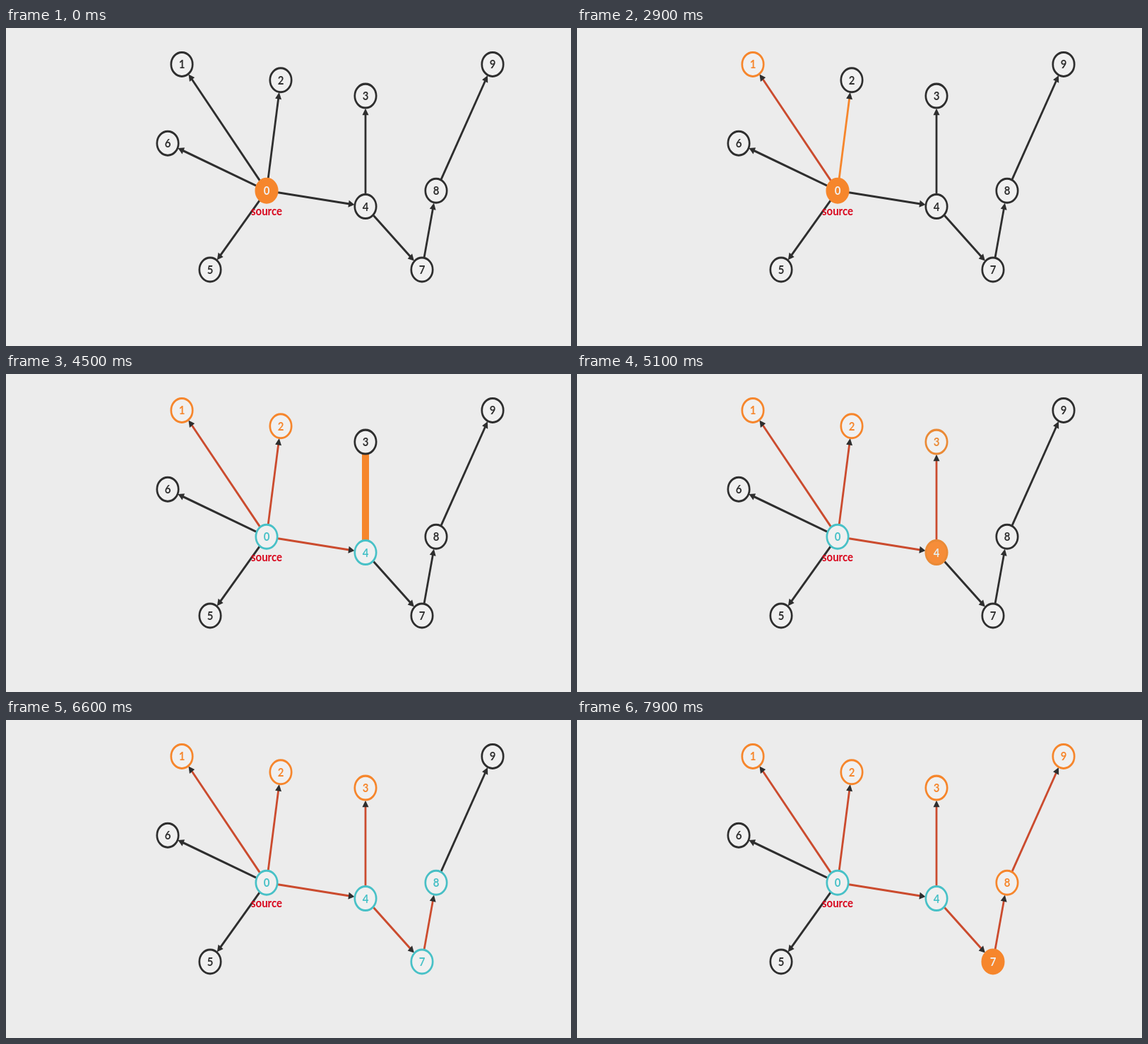
Animation of 800 by 450 pixels, one loop 8000 ms. Source, as an HTML page with a canvas:

```html
<!DOCTYPE html>
<html lang="en">
<head>
<meta charset="utf-8">
<title>Depth-first traversal</title>
<style>
html, body { margin: 0; width: 100%; height: 100%; overflow: hidden; background: #ececec; }
canvas { display: block; width: 100vw; height: 100vh; }
</style>
</head>
<body>
<canvas id="stage" width="800" height="450"></canvas>
<script>
const ctx = document.getElementById('stage').getContext('2d');
const LOOP = 8000;
const STRETCH = 1.1175; // the scene is slightly taller than wide
const RADIUS = 15.2, REACH = 16.2;

const DARK = [46, 46, 46], PAPER = [240, 240, 240], ORANGE = [246, 134, 44],
      CYAN = [72, 193, 199], RED = [203, 75, 46];

// Each style is [fill, outline, digit].
const IDLE = [PAPER, DARK, DARK], OPEN = [PAPER, CYAN, CYAN],
      DONE = [PAPER, ORANGE, ORANGE], CURRENT = [ORANGE, ORANGE, PAPER];

const NODES = [
  [369, 206], [249, 46], [389, 66], [509, 86], [509, 226],
  [289, 306], [229, 146], [589, 306], [609, 206], [689, 46]
];
const EDGES = [[0, 1], [0, 2], [0, 4], [0, 5], [0, 6], [4, 3], [4, 7], [7, 8], [8, 9]];

// [start, end, action, parent, child]
const STEPS = [
  [1900, 2200, 'walk', 0, 1], [2200, 2500, 'enter', 0, 1], [2500, 2800, 'back', 0, 1],
  [2880, 3150, 'walk', 0, 2], [3150, 3450, 'enter', 0, 2], [3450, 3750, 'back', 0, 2],
  [3750, 4020, 'walk', 0, 4], [4020, 4250, 'enter', 0, 4],
  [4250, 4490, 'walk', 4, 3], [4540, 4820, 'enter', 4, 3], [4930, 5160, 'back', 4, 3],
  [5160, 5400, 'walk', 4, 7], [5400, 5690, 'enter', 4, 7],
  [5780, 6150, 'walk', 7, 8], [6250, 6660, 'enter', 7, 8],
  [6730, 7000, 'walk', 8, 9], [7000, 7300, 'enter', 8, 9],
  [7300, 7600, 'back', 8, 9], [7600, 7880, 'back', 7, 8]
];

const clamp = v => Math.max(0, Math.min(1, v));
const ease = k => k < 0.5 ? 4 * k ** 3 : 1 - 4 * (1 - k) ** 3;
const mix = (a, b, k) => a.map((v, i) => v + (b[i] - v) * k);
const blend = (from, to, k) => from.map((c, i) => mix(c, to[i], k));
const css = c => `rgb(${c.map(Math.round)})`;

function sceneAt(t) {
  const styles = NODES.map((_, i) => i ? IDLE : CURRENT);
  const edges = EDGES.map(([from, to]) => ({ from, to, color: DARK, grown: 0 }));
  for (const [start, end, action, parent, child] of STEPS) {
    if (t < start) break;
    const k = ease(clamp((t - start) / (end - start)));
    const edge = edges.find(e => e.from === parent && e.to === child);
    const fade = (node, style) => { styles[node] = blend(styles[node], style, k); };
    if (action === 'walk') {
      edge.color = ORANGE;
      edge.grown = k;
    } else if (action === 'enter') {
      edge.grown = 0;
      edge.color = mix(ORANGE, RED, k);
      fade(parent, OPEN);
      fade(child, OPEN);
    } else {
      fade(parent, CURRENT);
      fade(child, DONE);
    }
  }
  return { styles, edges };
}

function line(x1, x2, width, color) {
  ctx.strokeStyle = css(color);
  ctx.lineWidth = width;
  ctx.beginPath();
  ctx.moveTo(x1, 0);
  ctx.lineTo(x2, 0);
  ctx.stroke();
}

function drawEdge({ from, to, color, grown }) {
  const [x, y] = NODES[from];
  const dx = NODES[to][0] - x, dy = NODES[to][1] - y;
  const tip = Math.hypot(dx, dy) - REACH;
  ctx.save();
  ctx.translate(x, y);
  ctx.rotate(Math.atan2(dy, dx));
  line(REACH, tip - 5, 2.8, color);
  ctx.fillStyle = css(DARK);
  ctx.beginPath();
  ctx.moveTo(tip + 0.5, 0);
  ctx.lineTo(tip - 8, -4.5);
  ctx.lineTo(tip - 8, 4.5);
  ctx.fill();
  if (grown > 0) line(REACH - 1, REACH - 1 + (tip - REACH + 2) * grown, 10, ORANGE);
  ctx.restore();
}

function drawNode([x, y], [fill, outline, digit], label) {
  ctx.beginPath();
  ctx.arc(x, y, RADIUS, 0, Math.PI * 2);
  ctx.fillStyle = css(fill);
  ctx.fill();
  ctx.strokeStyle = css(outline);
  ctx.lineWidth = 2.7;
  ctx.stroke();
  ctx.fillStyle = css(digit);
  ctx.fillText(label, x, y + 5.4);
}

function draw(t) {
  const { styles, edges } = sceneAt(t);
  ctx.setTransform(1, 0, 0, 1, 0, 0);
  ctx.fillStyle = '#ececec';
  ctx.fillRect(0, 0, 800, 450);
  ctx.scale(1, STRETCH);
  ctx.textAlign = 'center';
  ctx.font = 'bold 15px Lato, "Open Sans", sans-serif';
  edges.forEach(drawEdge);
  NODES.forEach((spot, i) => drawNode(spot, styles[i], String(i)));
  ctx.fillStyle = '#d8061c';
  ctx.fillText('source', 369, 237.4);
}

const begin = performance.now();
function tick() {
  draw((performance.now() - begin) % LOOP);
  requestAnimationFrame(tick);
}
tick();
</script>
</body>
</html>
```
